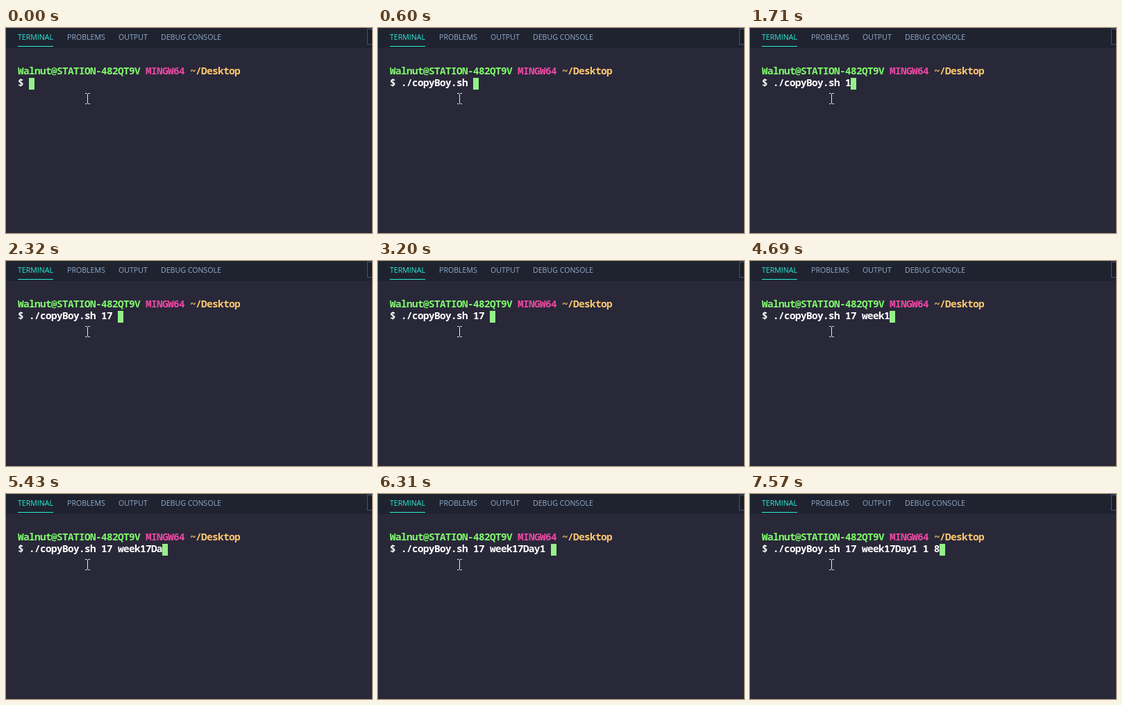
Animation, 527 px wide and 296 px high, one loop 8000 ms. Source, as an HTML page:

```html
<!DOCTYPE html>
<html lang="en">
<head>
<meta charset="utf-8">
<title>Terminal</title>
<style>
  html, body { margin: 0; width: 100%; height: 100%; overflow: hidden; background: #292839; }
  svg { display: block; width: 527px; height: 296px; }
  text { white-space: pre; }
  .tabs { font: 10.6px "Open Sans", "Noto Sans", sans-serif; fill: #92abc9; }
  /* letter-spacing keeps every character on the 8px grid */
  .term { font: 600 14.4px "Noto Sans Mono", "DejaVu Sans Mono", monospace;
          letter-spacing: calc(8px - 0.6em); font-variant-ligatures: none; fill: #fff; }
  .active { fill: #2ceed6; }
  .user { fill: #80fb6c; }
  .system { fill: #ee48a4; }
  .path { fill: #ffc96e; }
  .block { fill: #95f089; }
</style>
</head>
<body>
<svg viewBox="0 0 527 296">
  <rect width="527" height="296" fill="#292839"/>
  <rect width="527" height="29" fill="#1f2330"/>
  <g class="tabs">
    <text class="active" x="17" y="17">TERMINAL</text>
    <text x="88" y="17">PROBLEMS</text>
    <text x="162" y="17">OUTPUT</text>
    <text x="223" y="17">DEBUG CONSOLE</text>
  </g>
  <rect class="active" x="17" y="26" width="51" height="1"/>
  <rect x="520.5" y="1.5" width="20" height="22" fill="#1b1e2a" stroke="#36597c"/>
  <g class="term">
    <text class="user" x="17" y="67">Walnut@STATION-482QT9V</text>
    <text class="system" x="201" y="67">MINGW64</text>
    <text class="path" x="265" y="67">~/Desktop</text>
    <text x="17" y="84">$</text>
    <text id="command" x="33" y="84"></text>
  </g>
  <rect id="caret" class="block" x="33" y="72" width="8" height="17"/>
  <path d="M114 94.5h2.5l1 1 1-1h2.5M117.5 95.5v13M114 109.5h2.5l1-1 1 1h2.5"
        fill="none" stroke="#e6e6e8"/>
</svg>
<script>
  const LOOP = 8000, CELL = 8, START = 33;
  const TAB = "\t", BACK = "\b";

  // Bursts of evenly spaced keys, times in ms
  const bursts = [
    { at: 90, gap: 102, keys: "./cop" + TAB },
    { at: 1710, gap: 150, keys: "17" },
    { at: 2320, gap: 370, keys: " W" },
    { at: 3200, gap: 142, keys: BACK + "week" },
    { at: 4690, gap: 140, keys: "17" },
    { at: 5200, gap: 216, keys: "Day1" },
    { at: 6310, gap: 420, keys: " 1 8" }
  ];

  function press(line, key) {
    if (key === TAB) return "./copyBoy.sh ";
    if (key === BACK) return line.slice(0, -1);
    return line + key;
  }

  function lineAt(t) {
    return bursts
      .flatMap(({ at, gap, keys }) => [...keys].filter((_, i) => at + i * gap <= t))
      .reduce(press, "");
  }

  const command = document.getElementById("command");
  const caret = document.getElementById("caret");
  const began = performance.now();

  function draw() {
    const line = lineAt((performance.now() - began) % LOOP);
    command.textContent = line;
    caret.setAttribute("x", START + line.length * CELL);
    requestAnimationFrame(draw);
  }
  draw();
</script>
</body>
</html>
```
